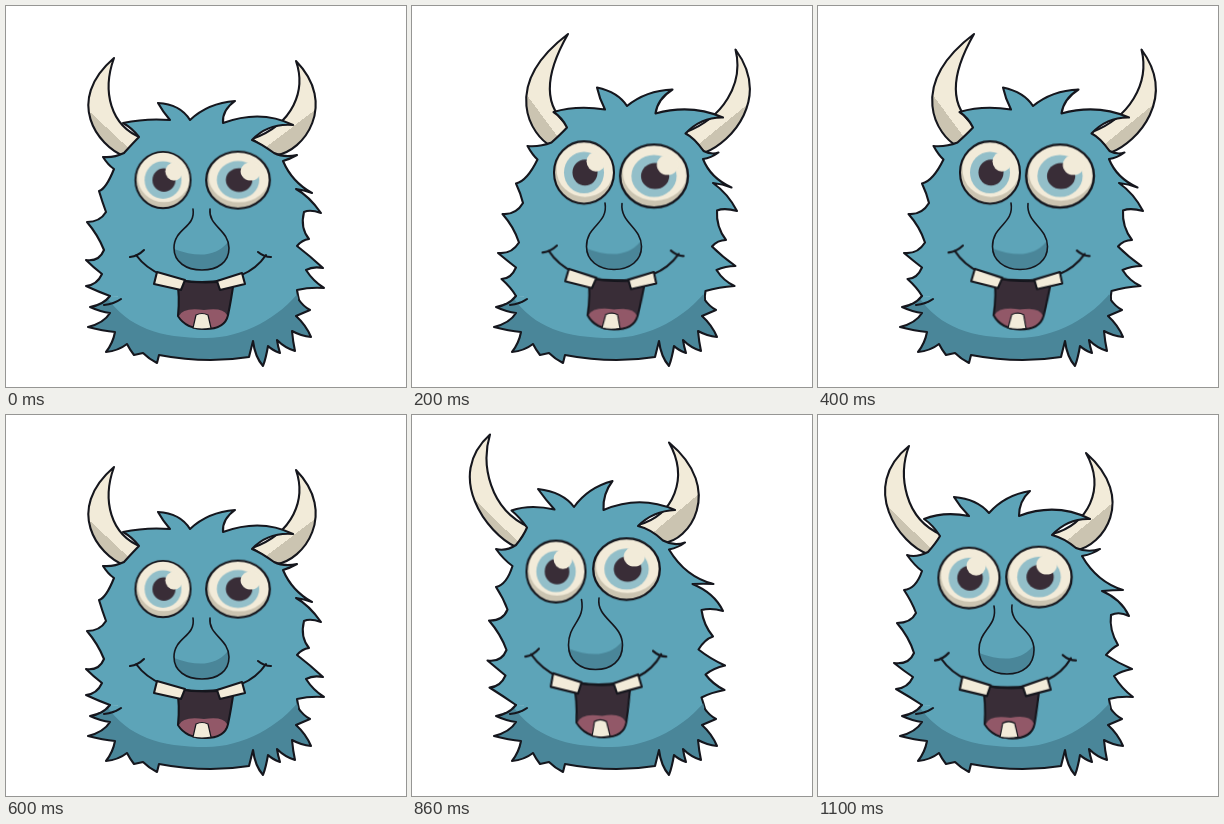
These frames come from a looping animation (400x381 px, 1.2 s). An HTML page without scripts:

```html
<!DOCTYPE html>
<html lang="en">
<head>
<meta charset="utf-8">
<title>Swaying monster</title>
<style>
html, body { margin: 0; width: 100%; height: 100%; overflow: hidden; background: #fff; }
svg { display: block; width: 400px; height: 381px; stroke-linejoin: round; stroke-linecap: round; }
.ink { stroke: #15161d; stroke-width: 2.1; }
.fur { fill: #5da4b8; }
.dark { fill: #4a8699; }
.cream { fill: #f2ebd9; }
.none { fill: none; }

/* Poses: --a rest, --b and --c lean right, --d and --e lean left */
.bend { d: var(--a); animation: bend 1.2s step-end infinite; }
.move { transform: var(--a); animation: move 1.2s step-end infinite; }
@keyframes bend {
  0%, 50%, 100% { d: var(--a); }
  8.333% { d: var(--b); animation-timing-function: steps(2); }
  25% { d: var(--c); animation-timing-function: steps(2); }
  41.666% { d: var(--b); }
  58.333% { d: var(--d); animation-timing-function: steps(2); }
  75% { d: var(--e); animation-timing-function: steps(2); }
  91.666% { d: var(--d); }
}
@keyframes move {
  0%, 50%, 100% { transform: var(--a); }
  8.333% { transform: var(--b); animation-timing-function: steps(2); }
  25% { transform: var(--c); animation-timing-function: steps(2); }
  41.666% { transform: var(--b); }
  58.333% { transform: var(--d); animation-timing-function: steps(2); }
  75% { transform: var(--e); animation-timing-function: steps(2); }
  91.666% { transform: var(--d); }
}

#head {
  --a: path("M104 290Q93 286 80 280Q91 279 96 268Q87 261 80 254Q93 256 98 244Q92 229 81 216Q94 216 100 206Q96 195 93 185Q100 183 108 163Q102 159 97 151Q108 152 118 147Q128 136 133 131Q126 122 117 117Q140 112 164 114Q157 106 152 97Q174 98 184 114Q202 97 229 95Q216 104 217 117Q255 103 287 119Q262 117 246 134Q254 137 268 147Q278 152 291 149Q284 153 277 155Q286 176 306 187Q298 184 290 183Q303 190 315 207Q304 203 298 206Q294 222 303 233Q296 234 291 240Q304 250 317 262Q307 260 300 264Q307 275 318 282Q304 281 291 284Q292 290 293 294");
  --b: path("M104 290Q96 285 83 277Q93 277 98 265Q90 258 82 250Q95 252 101 240Q96 225 85 211Q97 211 103 201Q100 190 95 180Q105 177 114 159Q108 155 104 146Q116 147 127 142Q136 132 140 126Q135 117 127 113Q150 106 178 106Q172 98 168 88Q190 92 200 105Q218 90 244 87Q231 96 230 109Q268 98 303 113Q280 112 263 129Q272 133 284 145Q292 150 299 149Q292 153 285 153Q290 172 312 182Q304 179 295 178Q310 188 319 205Q308 201 301 204Q299 220 306 231Q299 232 294 239Q306 249 320 261Q310 260 302 264Q308 275 318 280Q304 281 291 284Q292 290 293 294");
  --c: path("M104 290Q103 279 96 269Q105 269 110 258Q100 251 90 244Q104 245 113 233Q108 217 96 205Q111 207 119 193Q117 184 113 175Q125 173 137 148Q133 143 127 134Q140 135 152 131Q162 124 170 117Q165 106 156 99Q180 92 208 101Q203 88 202 75Q222 80 230 95Q250 79 277 80Q260 90 257 106Q290 97 319 110Q298 110 284 126Q292 130 299 145Q307 148 314 144Q306 151 297 153Q307 172 327 181Q317 177 307 176Q322 187 331 205Q317 202 309 205Q309 222 322 237Q312 236 306 242Q314 252 327 259Q317 260 307 264Q315 275 327 280Q310 281 296 286Q293 290 293 294");
  --d: path("M104 290Q92 282 78 274Q90 273 95 262Q86 256 76 248Q91 250 96 238Q91 222 79 208Q93 208 98 198Q94 187 86 175Q98 174 104 156Q97 151 89 140Q98 143 110 137Q118 128 122 121Q115 110 106 104Q126 96 151 101Q142 92 136 82Q159 84 171 98Q187 80 212 76Q201 86 201 101Q238 87 272 104Q250 103 234 120Q246 123 258 133Q270 138 282 134Q275 139 264 141Q279 167 305 175Q295 175 284 176Q303 184 311 201Q301 196 293 200Q291 215 300 230Q294 233 288 240Q300 248 314 254Q303 256 296 261Q304 274 315 282Q302 281 291 284Q292 290 293 294");
  --e: path("M104 290Q90 280 77 271Q87 271 92 259Q84 251 75 243Q88 245 93 232Q87 217 75 203Q89 204 93 191Q89 180 82 169Q91 166 97 146Q86 138 79 128Q90 130 98 123Q105 114 108 104Q100 94 93 87Q110 82 134 88Q124 76 116 66Q143 70 153 86Q165 65 189 56Q180 72 182 89Q218 72 254 86Q232 89 218 102Q232 105 244 118Q254 125 264 121Q258 126 250 128Q268 157 298 163Q288 162 277 162Q302 172 311 191Q298 189 286 190Q292 205 302 213Q291 216 285 229Q297 240 312 247Q300 250 291 258Q298 265 310 268Q296 274 288 281Q292 290 293 294");
}
#hornL {
  --a: path("M118 150C92 140 58 95 108 52C96 85 104 120 136 132Z");
  --b: path("M127 147C104 137 72 85 131 39C112 78 116 110 142 124Z");
  --c: path("M153 134C134 124 103 75 181 17C153 60 146 92 172 116Z");
  --d: path("M110 139C82 130 40 72 91 31C80 60 86 104 124 120Z");
  --e: path("M98 125C68 108 24 50 65 8C58 38 68 84 110 104Z");
}
#hornR {
  --a: path("M270 149C298 146 332 98 290 55C300 84 288 118 246 133Z");
  --b: path("M286 147C310 138 344 90 308 39C320 76 300 112 262 128Z");
  --c: path("M300 146C330 134 374 94 339 48C344 80 322 112 284 125Z");
  --d: path("M258 135C284 132 320 84 268 38C288 74 270 110 234 119Z");
  --e: path("M244 120C268 124 308 66 246 17C266 52 254 90 218 101Z");
}
#nose {
  --a: path("M187 203C190 222 168 222 168 242C168 256 180 264 196 264C212 264 223 256 223 242C223 224 202 220 204 203");
  --b: path("M186 201C190 222 168 222 168 242C168 256 180 265 196 265C212 265 223 256 223 242C223 224 202 220 203 201");
  --c: path("M200 193C203 214 181 216 181 239C181 253 193 262 208 262C224 262 236 253 236 239C236 219 214 214 217 194");
  --d: path("M176 191C180 212 161 214 161 235C161 250 173 259 189 259C205 259 216 250 216 235C216 214 191 210 194 190");
  --e: path("M163 178C167 200 152 203 152 225C152 241 163 250 178 250C194 250 205 241 205 225C205 203 177 197 180 176");
}
#noseShade {
  --a: translate(0px, 0px);
  --b: translate(0px, 1px);
  --c: translate(13px, -2px);
  --d: translate(-7px, -5px);
  --e: translate(-17px, -14px);
}
#eyeL {
  --a: translate(157px, 174px) scale(.92, .94);
  --b: translate(162px, 171px) scale(1, 1.02);
  --c: translate(182px, 162px) scale(1, 1.06);
  --d: translate(151px, 163px) scale(1.02, 1.01);
  --e: translate(137px, 150px) scale(.95, 1.05);
}
#eyeR {
  --a: translate(232px, 174px) scale(1.06, .95);
  --b: translate(234px, 171px) scale(1.1, 1.02);
  --c: translate(250px, 169px) scale(1.16, 1.08);
  --d: translate(221px, 162px) scale(1.09, 1.01);
  --e: translate(208px, 146px) scale(1.13, 1.04);
}
#glint {
  --a: translate(12px, -9px);
  --b: translate(12px, -10px);
  --c: translate(12px, -11px);
  --d: translate(6px, -11px);
  --e: translate(8px, -13px);
}
#mouth {
  --a: matrix(1, 0, 0, 1, 0, 0);
  --b: matrix(1, 0, -.02, 1.03, 7.4, -8.6);
  --c: matrix(1, .05, -.08, 1.05, 30.6, -26.75);
  --d: matrix(1, 0, .03, 1.08, -14.6, -25.6);
  --e: matrix(1, 0, .08, 1.16, -34, -53.5);
}
</style>
</head>
<body>
<svg viewBox="0 0 400 381">
  <defs>
    <linearGradient id="boneL" x1=".655" y1=".245" x2=".245" y2="1.045">
      <stop offset=".62" stop-color="#f2ebd9"/>
      <stop offset=".62" stop-color="#cbc4b1"/>
    </linearGradient>
    <linearGradient id="boneR" x1=".345" y1=".245" x2=".755" y2="1.045">
      <stop offset=".6" stop-color="#f2ebd9"/>
      <stop offset=".6" stop-color="#cbc4b1"/>
    </linearGradient>
    <path id="low" d="M293 294Q297 300 304 304Q297 307 290 310Q300 319 305 331Q295 330 286 325Q287 336 289 345Q279 342 271 334Q272 341 274 347Q266 344 262 340Q260 352 257 360Q249 351 247 335L243 351Q200 358 153 349L151 357Q143 353 137 347L128 349Q124 344 121 338Q112 345 100 346Q107 337 109 326Q97 325 82 321Q98 317 104 307Q95 306 84 301Q97 299 104 290"/>
    <clipPath id="lowClip">
      <use href="#low"/>
      <path d="M240 284H290L293 296H240Z"/>
    </clipPath>
    <g id="eye">
      <circle r="30" fill="#cbc4b1"/>
      <ellipse cx="1" cy="-3" rx="28.5" ry="26.5" class="cream"/>
      <circle r="20" fill="#93bfc9"/>
      <circle cx="1" r="12.5" fill="#392d37"/>
      <circle id="glint" class="cream move" r="9.5"/>
      <circle r="30" class="none ink"/>
    </g>
  </defs>

  <path id="hornL" class="bend ink" fill="url(#boneL)"/>
  <path id="hornR" class="bend ink" fill="url(#boneR)"/>

  <path id="head" class="bend fur ink"/>
  <use href="#low" class="fur"/>
  <rect class="fur" x="112" y="282" width="176" height="20"/>
  <path class="dark" clip-path="url(#lowClip)" d="M80 290H100C122 322 154 332 200 332C238 332 276 310 296 282H330V381H80Z"/>
  <use href="#low" class="none ink"/>
  <path class="none ink" d="M98 299Q108 298 115 293"/>

  <use href="#eye" id="eyeL" class="move"/>
  <use href="#eye" id="eyeR" class="move"/>

  <path id="noseShade" class="dark move" d="M168 242C168 256 180 264 196 264C212 264 223 256 223 242L222 236Q205 257 168 243Z"/>
  <path id="nose" class="bend none ink" style="stroke-width:1.6"/>

  <g id="mouth" class="move ink">
    <path fill="#392d37" d="M171 274Q174 290 172 310Q180 323 199 323Q219 323 222 309Q225 295 228 274Q200 279 171 274Z"/>
    <path fill="#925868" stroke="none" d="M173 310Q177 301 198 304Q217 301 221 309Q218 322 199 322Q181 322 173 310Z"/>
    <path class="cream" stroke-width="1.2" d="M190 309Q196 306 202 309L205 322Q196 324 187 322Z"/>
    <path class="none" d="M130 249Q150 276 196 276Q242 276 260 249M124 251Q132 250 138 244M252 246Q258 251 265 251"/>
    <path class="cream" d="M151 266L179 274L175 284L148 278Z"/>
    <path class="cream" d="M211 275L236 267L239 278L214 284Z"/>
  </g>
</svg>
</body>
</html>
```
